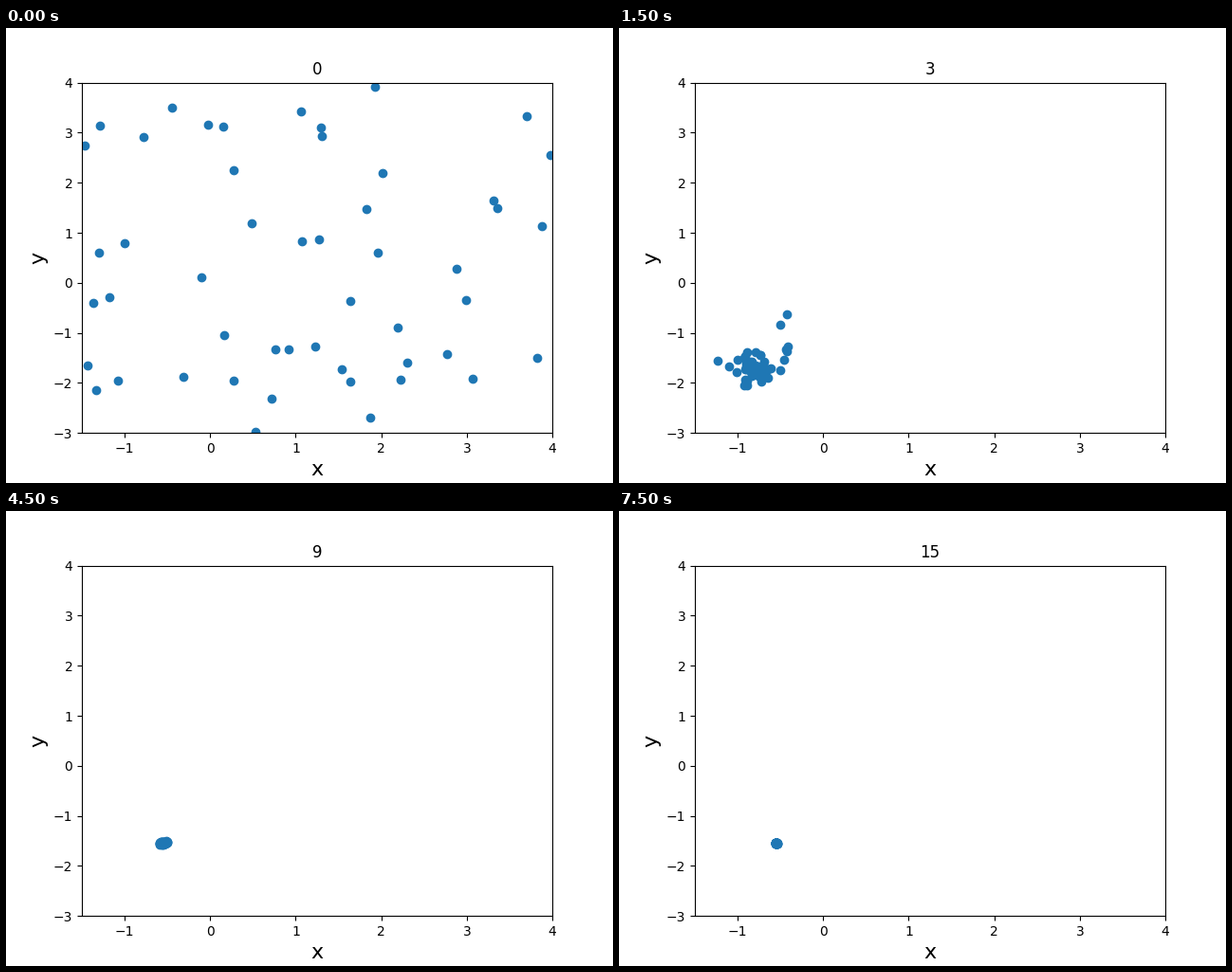
A matplotlib script for the animation above (8000 ms loop, 640 by 480 pixels).

```python
import numpy as np
import matplotlib.pyplot as plt
from matplotlib.animation import FuncAnimation

STEPS, STEP_MS, SWARM = 16, 500, 50
LOW, HIGH = np.array([-1.5, -3]), np.array([4, 4])
LEADER = np.array([-1.08, -1.96])    # best point of the first swarm
BEST = np.array([-0.547, -1.547])    # minimum of the function
WOBBLE = np.array([0.25, 0.3])

rng = np.random.default_rng(7)
start = rng.uniform(LOW, HIGH, (SWARM, 2))
start[0] = LEADER
rate = rng.uniform(0.4, 1.6, (SWARM, 1))
noise = rng.normal(size=(STEPS, SWARM, 2))
noise[1, 0] = 0                      # the leader waits one step


def swarm(step):
    """Points closing in on a core that drifts from LEADER to BEST."""
    if step == 0:
        return start
    drift = np.exp(-(step / 3) ** 2) if step > 1 else 1
    core = BEST + (LEADER - BEST) * drift
    pull = np.exp(-rate * step ** 1.3)
    spread = WOBBLE * (np.exp(-(step / 5) ** 1.8) + 0.02)
    points = core + (start - LEADER) * pull + noise[step] * spread
    # bounce off the edges of the search area
    points = LOW + np.abs(points - LOW)
    return HIGH - np.abs(HIGH - points)


fig, ax = plt.subplots(figsize=(6.4, 4.8), dpi=100)
dots = ax.scatter(*start.T, color="C0")
ax.set_xlim(LOW[0], HIGH[0])
ax.set_ylim(LOW[1], HIGH[1])
ax.set_xlabel("x", fontsize=16)
ax.set_ylabel("y", fontsize=16)
title = ax.set_title("0")


def update(step):
    dots.set_offsets(swarm(step))
    title.set_text(str(step))
    return dots, title


anim = FuncAnimation(fig, update, frames=STEPS, interval=STEP_MS,
                     repeat=True, repeat_delay=0)
plt.show()
```
